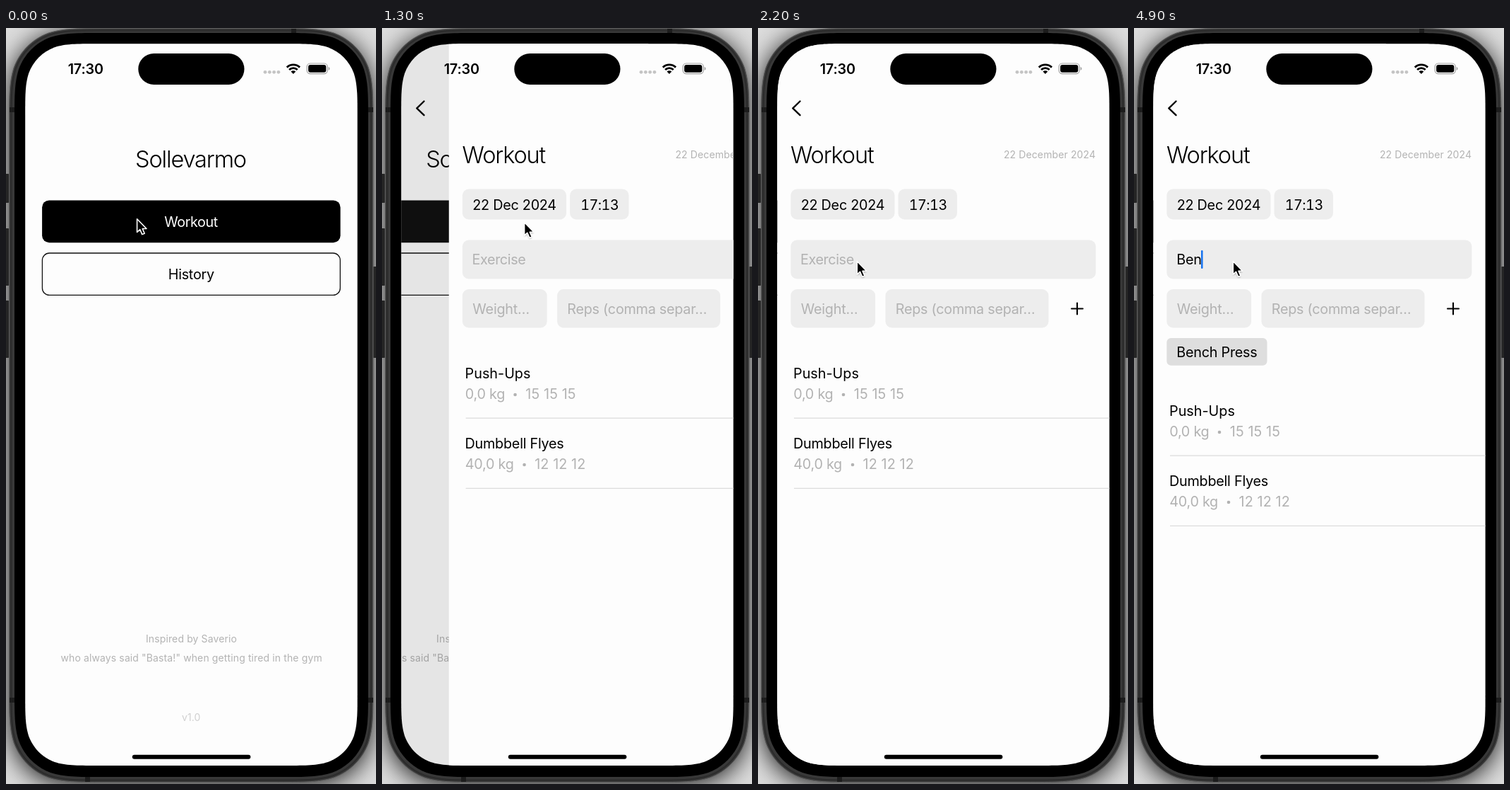
Write an HTML page that moves like this. It is 524x1068 px and loops after 5000 ms.

```html
<!DOCTYPE html>
<html lang="en">
<head>
<meta charset="utf-8">
<title>Workout log</title>
<style>
  html, body { margin: 0; width: 100%; height: 100%; overflow: hidden; background: #dcdcdc; }
  svg { display: block; width: 100%; height: 100%; }
  text {
    font: 400 19.8px Inter, "Liberation Sans", sans-serif;
    font-optical-sizing: none;
    letter-spacing: -.25px;
    white-space: pre;
  }
  .title { font-weight: 300; font-size: 32.5px; letter-spacing: -1.15px; }
  .small { font-size: 14px; letter-spacing: .12px; fill: #b3b3b3; }
  .clock { font-weight: 600; letter-spacing: -.15px; }
  .picker { font-variant-numeric: tabular-nums; letter-spacing: -.6px; }
  .reps { letter-spacing: .1px; }
  .grey { fill: #b2b2b2; }
  .mid { text-anchor: middle; }
  .end { text-anchor: end; }
  .box { fill: #ededed; }
  .chip { fill: #dedede; }
  .line { stroke: #dcdcdc; stroke-width: 1.2; }
</style>
</head>
<body>
<svg viewBox="0 0 524 1068">
  <defs>
    <clipPath id="glass"><path data-box="27.2 22.2 470.4 1019.8 66"/></clipPath>
    <filter id="blur" x="-20%" y="-20%" width="140%" height="140%"><feGaussianBlur stdDeviation="17"/></filter>
    <filter id="soft" x="-50%" y="-50%" width="200%" height="200%"><feGaussianBlur stdDeviation="1.3"/></filter>
  </defs>

  <!-- phone body -->
  <rect width="524" height="1068" fill="#dcdcdc"/>
  <path data-box="4 5 516 1066 88" opacity=".85" filter="url(#blur)"/>
  <g fill="#252525">
    <rect x="-4" y="206" width="9" height="41" rx="2"/>
    <rect x="-4" y="283" width="9" height="81" rx="2"/>
    <rect x="-4" y="385" width="9" height="81" rx="2"/>
    <rect x="519" y="337" width="9" height="129" rx="2"/>
  </g>
  <path data-box="4.5 .5 515.5 1065 88" fill="#383838" stroke="#626262"/>
  <path data-box="7.5 3.5 509.5 1059 85" fill="none" stroke="#2b2b2b" stroke-width="2"/>
  <path d="M5 112h8v7h-8zM512 112h8v7h-8zM5 946h8v7h-8zM512 946h8v7h-8zM404 1h7v7h-7zM112 1057h7v8h-7z" fill="#1c1c1c"/>
  <path data-box="12 7 501 1051 81"/>

  <g clip-path="url(#glass)">
    <g id="home">
      <rect x="27" y="22" width="471" height="1021" fill="#fdfdfd"/>
      <text class="title mid" x="261.5" y="197">Sollevarmo</text>
      <g id="button">
        <rect x="51.1" y="243.4" width="422.5" height="59.8" rx="10"/>
        <text class="mid" x="262" y="281" fill="#fff" style="letter-spacing:-.4px">Workout</text>
      </g>
      <rect x="51.4" y="318" width="421.9" height="59.4" rx="10" fill="none" stroke="#111" stroke-width="1.3"/>
      <text class="mid" x="262.3" y="355">History</text>
      <text class="small mid" x="262.5" y="868">Inspired by Saverio</text>
      <text class="small mid" x="262.6" y="895">who always said "Basta!" when getting tired in the gym</text>
      <text class="small mid" x="262.3" y="979" style="fill:#d0d0d0">v1.0</text>
    </g>
    <rect id="dim" width="524" height="1068"/>

    <g id="page">
      <rect x="27.2" y="22" width="471" height="1021" fill="#fdfdfd"/>
      <text class="title" x="46" y="191">Workout</text>
      <text class="small end" x="478.2" y="183.7">22 December 2024</text>
      <rect class="box" x="46.3" y="227.5" width="147.2" height="43" rx="9"/>
      <rect class="box" x="198.5" y="227.5" width="83.5" height="43" rx="9"/>
      <text class="mid" x="120" y="256.7">22 Dec 2024</text>
      <text class="picker mid" x="240.6" y="256.7">17:13</text>
      <rect class="box" x="46.3" y="299.5" width="432.1" height="55" rx="9"/>
      <rect class="box" x="46.3" y="369" width="119.8" height="54.5" rx="9"/>
      <rect class="box" x="180.5" y="369" width="231" height="54.5" rx="9"/>
      <text id="hint" class="grey" x="60" y="334.3" style="letter-spacing:-.4px">Exercise</text>
      <text id="typed" x="60.3" y="334.3"></text>
      <rect id="caret" y="314" width="2.5" height="26" rx="1.2" fill="#1673f0"/>
      <text class="grey" x="60.8" y="404">Weight…</text>
      <text class="grey" x="194.7" y="404">Reps (comma separ…</text>
      <path d="M444 396.5h16M452 388.5v16" stroke="#000" stroke-width="2.1" stroke-linecap="round"/>
      <g id="chips">
        <rect class="chip" x="46.3" y="438" width="142.2" height="38.7" rx="6"/>
        <text x="60.3" y="464.8">Bench Press</text>
        <g id="second">
          <rect class="chip" x="198.3" y="438" width="168.5" height="38.7" rx="6"/>
          <text x="212.3" y="464.8">Dumbbell Flyes</text>
        </g>
      </g>
      <g id="list">
        <text x="50" y="495" style="letter-spacing:0">Push-Ups</text>
        <g class="grey">
          <text x="50.2" y="524.2">0,0 kg</text>
          <circle cx="121" cy="518" r="2.3"/>
          <text class="reps" x="135.8" y="524.2">15 15 15</text>
        </g>
        <path class="line" d="M51 551.2H498"/>
        <text x="50" y="594">Dumbbell Flyes</text>
        <g class="grey">
          <text x="50.2" y="623.2">40,0 kg</text>
          <circle cx="134" cy="617" r="2.3"/>
          <text class="reps" x="148.6" y="623.2">12 12 12</text>
        </g>
        <path class="line" d="M51 650.4H498"/>
      </g>
    </g>
    <path id="back" d="M59.5 103.5L49.3 113.3L59.5 123.2" fill="none" stroke="#000" stroke-width="2.4" stroke-linecap="round" stroke-linejoin="round"/>
  </g>

  <!-- status bar -->
  <text class="clock mid" x="112.8" y="64.9">17:30</text>
  <rect x="187.3" y="36" width="150.2" height="44" rx="22"/>
  <g fill="#c4c4c4">
    <circle cx="367" cy="62.3" r="2.4"/><circle cx="373.3" cy="62.3" r="2.4"/>
    <circle cx="379.6" cy="62.3" r="2.4"/><circle cx="385.9" cy="62.3" r="2.4"/>
  </g>
  <g fill="none" stroke="#000" stroke-width="2.9">
    <path d="M397.8 55.6A13 13 0 0 1 416 55.6"/>
    <path d="M401.1 59A8.3 8.3 0 0 1 412.7 59"/>
  </g>
  <path d="M406.9 65L403.5 61.5A4.9 4.9 0 0 1 410.3 61.5Z"/>
  <rect x="426.2" y="50" width="29" height="14.6" rx="4.6" fill="none" stroke="#a0a0a0" stroke-width="1.2"/>
  <rect x="428.1" y="51.9" width="25.2" height="10.8" rx="3"/>
  <path d="M456.7 55a2.5 2.5 0 0 1 0 4.8z" fill="#a0a0a0"/>
  <rect x="178.8" y="1026.8" width="167.6" height="6" rx="3"/>

  <g id="cursor">
    <path d="M.8 1.5V20.2L5 16.4L8 23.3L11.4 21.9L8.5 15.2H14.2Z" transform="translate(0 1.5)" opacity=".35" filter="url(#soft)"/>
    <path d="M.8 1.5V20.2L5 16.4L8 23.3L11.4 21.9L8.5 15.2H14.2Z" stroke="#fff" stroke-width="1.6" stroke-linejoin="round"/>
  </g>
</svg>

<script>
const LOOP = 5000, STEP = 100, WIDTH = 470.4;
const PUSH_START = 1109, PUSH_RATE = 17.95;
const parts = {};
for (const id of ['home', 'button', 'dim', 'page', 'hint', 'typed', 'caret',
  'chips', 'second', 'list', 'back', 'cursor']) parts[id] = document.getElementById(id);

const clamp = v => Math.max(0, Math.min(1, v));
const ease = v => v * v * (3 - 2 * v);
const between = (t, a, b) => ease(clamp((t - a) / (b - a)));
const move = (node, x, y) => node.setAttribute('transform', `translate(${x} ${y})`);
const fade = (node, alpha) => node.setAttribute('opacity', alpha);

// rectangle whose corners ease into the sides
function smoothRect(x, y, w, h, r) {
  const cx = x + w / 2, cy = y + h / 2;
  const a = 1.5287, b = 1.0885, c = 0.8684, d = 0.6315, e = 0.0749, f = 0.3728, g = 0.1691;
  const corner = [[0, a], [0, b], [0, c], [e, d], [g, f], [f, g], [d, e], [c, 0], [b, 0], [a, 0]];
  const points = [];
  for (const [sx, sy] of [[-1, -1], [1, -1], [1, 1], [-1, 1]]) {
    const placed = corner.map(([u, v]) =>
      `${cx + sx * (w / 2 - u * r)} ${cy + sy * (h / 2 - v * r)}`);
    if (sx !== sy) placed.reverse();
    points.push(placed[0] + 'C' + placed.slice(1).join(' '));
  }
  return 'M' + points.join('L') + 'Z';
}

for (const path of document.querySelectorAll('[data-box]')) {
  path.setAttribute('d', smoothRect(...path.dataset.box.split(' ').map(Number)));
}

// critically damped spring, 0 to 1
function pushed(t) {
  const x = Math.max(0, t - PUSH_START) / 1000 * PUSH_RATE;
  return 1 - (1 + x) * Math.exp(-x);
}

function caretAlpha(t) {
  if (t < 3100) return 0;
  if (t < 3900) return 1 - clamp((t - 3600) / 200);
  return clamp((t - 3900) / 300);
}

function typedText(t) {
  return t < 4400 ? '' : t < 4600 ? 'B' : t < 4900 ? 'Be' : 'Ben';
}

function draw(t) {
  const p = pushed(t);
  move(parts.home, -0.3 * WIDTH * p, 0);
  move(parts.page, WIDTH * (1 - p), 0);
  fade(parts.dim, 0.11 * p);
  fade(parts.back, clamp(p * 1.2));
  fade(parts.button, t < PUSH_START ? 1 : 1 - 0.5 * Math.exp((1100 - t) / 100));

  const text = typedText(t);
  parts.typed.textContent = text;
  fade(parts.hint, text ? 0 : 1);
  fade(parts.chips, text ? 1 : 0);
  fade(parts.second, text.length < 3 ? 1 : 0);
  move(parts.list, 0, text ? 53 : 0);
  const end = text ? parts.typed.getComputedTextLength() - 1 : 0;
  parts.caret.setAttribute('x', 60.6 + end);
  fade(parts.caret, caretAlpha(t));

  const a = between(t, 0, 300), b = between(t, 1700, 2200);
  move(parts.cursor, 184.8 + 16 * a - 61.3 * b, 268.3 + 4.7 * a + 55 * b);
}

function frame(now) {
  draw(Math.floor(now % LOOP / STEP) * STEP);
  requestAnimationFrame(frame);
}
draw(0);
requestAnimationFrame(frame);
</script>
</body>
</html>
```
